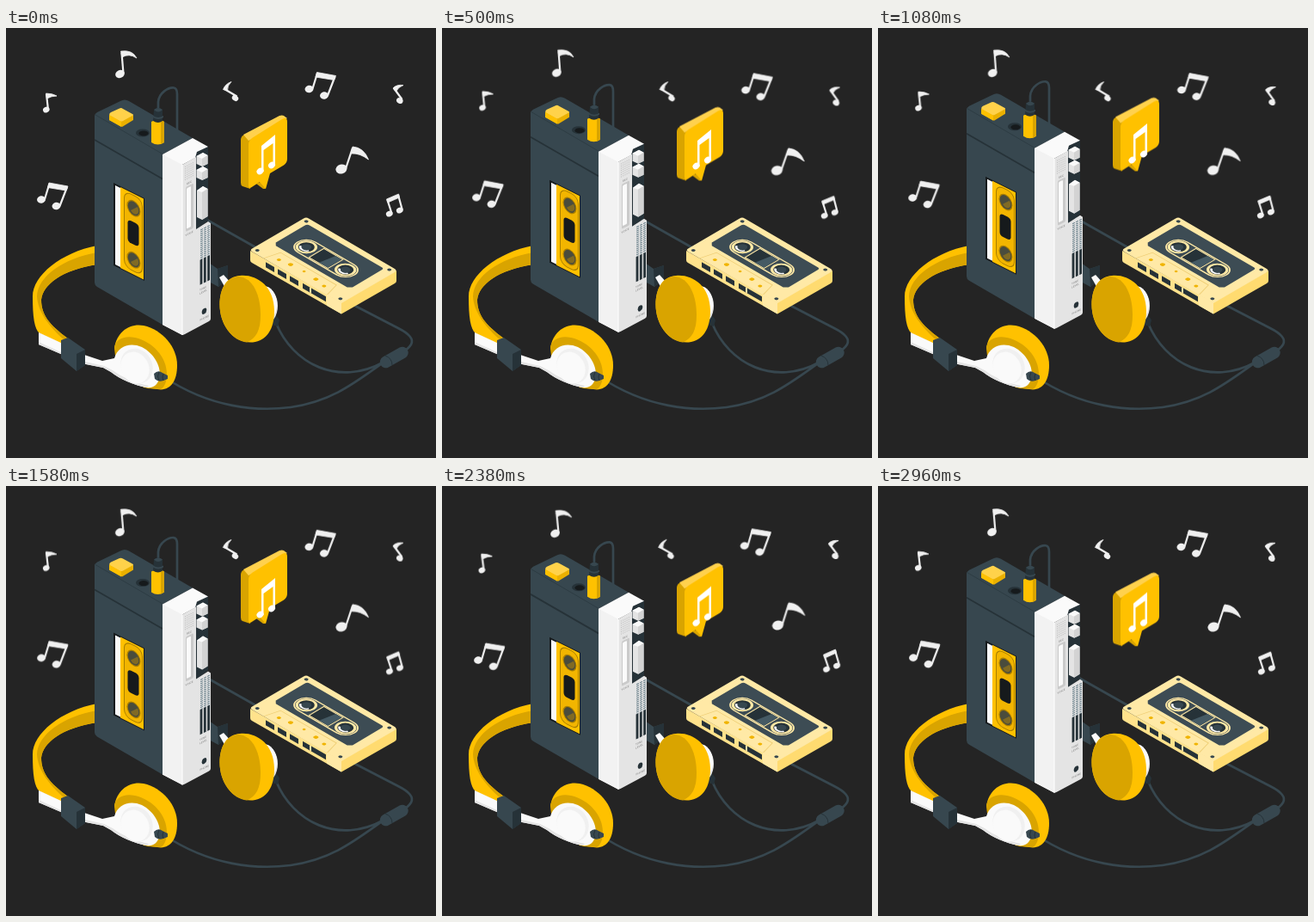
These frames come from a looping animation (500x500 px, 3000 ms). An HTML page:

```html
<!DOCTYPE html>
<html lang="en">
<head>
<meta charset="utf-8">
<title>Music player</title>
<style>
  html, body { margin: 0; height: 100%; overflow: hidden; background: #242424; }
  svg { display: block; width: 100vw; height: 100vh; }
  .float { animation: float 3s linear infinite; }
  .player { --rise: -10px; }
  .bubble { --rise: -28.5px; }
  .tune { --rise: -18px; }
  .notes { transform-origin: 249px 123px; animation: sway 3s linear infinite; }
  @keyframes float { 50% { transform: translateY(var(--rise)); } }
  @keyframes sway { 25% { transform: rotate(1deg); } 75% { transform: rotate(-1deg); } }
  .slate { fill: #37474f; }
  .label { fill: #3d4c54; }
  .deep { fill: #263238; }
  .black { fill: #161a1c; }
  .sun { fill: #ffc100; }
  .gold { fill: #d9a400; }
  .cream { fill: #ffe9a6; }
  .butter { fill: #ffe28c; }
  .white { fill: #fafafa; }
  .pale { fill: #e4e4e4; }
  .cable { fill: none; stroke: #37474f; stroke-width: 2.7; stroke-linecap: round; }
  .tiny { font: 3px Inter, sans-serif; fill: #777; }
  .notes { fill: #f0f0f0; stroke: #f0f0f0; }
  .notes path { fill: none; stroke-width: 2.2; stroke-linejoin: round; }
  .notes .solid { fill: #f0f0f0; stroke-width: .8; }
  .notes ellipse { stroke: none; }
</style>
</head>
<body>
<svg viewBox="0 0 500 500">
  <!-- cables -->
  <path class="cable" d="M230 221L292 256M400 320L456 349Q476 359 471 368Q468 373 461 377"/>
  <path class="cable" d="M314 343C333 390 386 418 440 388M184 406C238 442 292 446 331 441C379 434 405 413 440 388"/>
  <path d="M441.500 388.500L461 377.500" stroke="#37474f" stroke-width="13.500" stroke-linecap="round"/>
  <path d="M441 381Q449 384 449 392" fill="none" stroke="#263238"/>

  <!-- headband -->
  <path class="sun" d="M106 253C64 261 31 288 31 312C31 336 33 350 39 355L66 368L72 361C50 345 41 333 41 316C43 298 66 281 106 275Z"/>
  <path class="gold" d="M106 261C66 268 37 289 36 312C37 331 51 348 69 364L72 361C50 345 41 333 41 316C43 298 66 281 106 275Z"/>
  <path class="white" d="M38 354L66 367V380L38 368Z"/>
  <path class="pale" d="M38 365L66 378V380L38 368Z"/>

  <!-- far ear cup -->
  <path class="slate" d="M236 273L246 280L258 276V292L247 301L236 295Z"/>
  <path class="deep" d="M246 280L258 276V292L247 301Z"/>
  <path class="white" d="M248 290L253 287L262 297L256 304Z"/>
  <path class="deep" d="M307 335Q315 332 318 340L316 347L309 345Z"/>
  <ellipse class="pale" cx="302" cy="323" rx="14" ry="21"/>
  <ellipse class="white" cx="300" cy="321" rx="15" ry="21"/>
  <path class="sun" d="M272 288C290 286 312 299 312 329C312 350 303 364 287 365.500C263 367 248.500 344 248.500 322C248.500 302 257 289 272 288Z"/>
  <path class="gold" d="M270 289C288 290 296 312 296 334C296 351 291 361 280 365.500C263 364 248.500 344 248.500 322C248.500 303 256 290 270 289Z"/>

  <!-- cassette -->
  <path class="butter" d="M284 259L390 319V332.500L286 273Q284 272 284 270Z"/>
  <path d="M390 319L454 282V294Q454 296 452 297L390 332.500Z" fill="#ffdb70"/>
  <path class="cream" d="M287 256L346 221.500Q349 219.500 352 221.500L452 280Q455 282 452 284L390 320L286 260Q283 258 287 256Z"/>
  <g transform="matrix(1.05 .61 -1.016 .602 349 220)">
    <path class="label" d="M10 6H90Q92 6 92 9V42L89 45H10L7 42V9Q7 6 10 6Z"/>
    <rect class="cream" x="18" y="18.500" width="64" height="21" rx="10.500"/>
    <rect class="label" x="19.300" y="19.800" width="61.400" height="18.400" rx="9.200"/>
    <g id="reel">
      <circle class="cream" cx="28.400" cy="29" r="8.700"/>
      <circle class="deep" cx="28.400" cy="29" r="6.500"/>
      <path d="M24 31A5 5 0 0 0 33 31" fill="none" stroke="#fff" stroke-width="2"/>
      <circle class="slate" cx="28.400" cy="29" r="4"/>
    </g>
    <use href="#reel" x="43.200"/>
    <rect class="cream" x="39" y="20" width="22" height="18"/>
    <rect class="deep" x="40" y="21" width="20" height="16"/>
    <path d="M53 21H60V37H50Z" fill="#455a64"/>
    <path d="M15 64L19 49H81L85 64" fill="none" stroke="#efcf76" stroke-width=".8"/>
    <g fill="#37474f">
      <circle cx="4" cy="4" r="1.700"/><circle cx="96" cy="4" r="1.700"/>
      <circle cx="4" cy="60" r="1.700"/><circle cx="96" cy="60" r="1.700"/>
    </g>
    <g fill="#f0b400">
      <circle cx="25" cy="57" r="1.700"/><circle cx="36" cy="55" r="2"/><circle cx="64" cy="55" r="2"/>
      <circle cx="75" cy="57" r="1.700"/><circle cx="50" cy="54" r="1.300"/>
    </g>
  </g>
  <g transform="matrix(1 .57 0 1 284 259)">
    <path class="deep" d="M18 3H28V9H18ZM32 3H42V9H32ZM46 3H56V9H46ZM61 3H88V9H61Z"/>
    <path class="cream" d="M69 3H71V9H69ZM89 0H106V13H89Z"/>
  </g>

  <!-- player -->
  <g class="float player">
    <path class="cable" d="M177 97V86C178 75 189 69 195 69.500Q199 70 199 77V130"/>
    <path class="slate" d="M103 102Q103 100 106 98L133 85Q138 82 143 85L217 128L182 147V345L106 301Q103 299 103 296Z"/>
    <path d="M103 130L182 175.500" stroke="#263238" stroke-width="1.800"/>
    <path d="M104 101L182 146.500" stroke="#2d3c43" stroke-width="1"/>

    <path d="M120 101L134 108L148 101V107L135 115L120 107Z" fill="#eab000"/>
    <path d="M122 98L132 93.500Q134 92.500 136 94L147 100Q149 101 147 102L136 108Q134 109 132 108L121 102Q119 100 122 98Z" fill="#ffd24a"/>
    <path class="sun" d="M120 101L134 109V115L120 107Z"/>
    <ellipse class="deep" cx="159" cy="122" rx="8" ry="4.500"/>
    <ellipse class="black" cx="160" cy="122.500" rx="5.500" ry="3"/>
    <path class="sun" d="M169 109Q176.500 104 184 109V133Q176.500 138 169 133Z"/>
    <path class="gold" d="M180 107L184 109V133L180 135Z"/>
    <path class="deep" d="M172 95Q177 91 182 95V108Q177 112 171 108Z"/>
    <path class="slate" d="M172 95Q177 91 182 95Q177 100 172 95M171 102Q177 106 183 102V104Q177 108 171 104Z"/>

    <!-- cassette window -->
    <g transform="matrix(1 .5 0 1 125 180)">
      <path class="black" d="M0 0H36V96H0Z"/>
      <path class="white" d="M2 2H8V94H2Z"/>
      <path class="sun" d="M8 1H35V95H8Z"/>
      <rect x="12.500" y="3" width="21" height="88" rx="8" fill="#f2b500" stroke="#a97f00"/>
      <g id="spool">
        <ellipse cx="23.500" cy="18" rx="8" ry="9" fill="#a97f00"/>
        <ellipse cx="23.500" cy="18" rx="6.800" ry="7.800" fill="#4a4c3c"/>
        <path d="M20 22L28 14Q31 19 27 23Q23 26 20 22Z" fill="#806a24"/>
      </g>
      <use href="#spool" y="60"/>
      <rect class="black" x="16.500" y="34" width="13" height="26" rx="4"/>
    </g>

    <!-- white panel -->
    <path class="deep" d="M219 142L235 138V224L219 236Z"/>
    <path class="white" d="M182 147L217 128L235 138L222 144L220 151L205 159V357L182 345Z"/>
    <path d="M182 147L205 159V357L182 345Z" fill="#f2f2f2"/>
    <path class="pale" d="M205 159L221 150V234L235 225L238 227V338Q238 340 236 341L208 356Q206 357 205 357Z"/>
    <path d="M205 159V357" stroke="#fff"/>
    <g id="key">
      <path class="pale" d="M221.500 149L229 145L234.500 148V158L228 161L221.500 158Z"/>
      <path class="white" d="M221.500 149L229 145L234.500 148L228 152Z"/>
      <path d="M228 152L234.500 148V158L228 161Z" fill="#d3d3d3"/>
    </g>
    <use href="#key" y="16"/>
    <path class="pale" d="M222 189L229 184L234.500 187V219L228 223L222 220Z"/>
    <path class="white" d="M222 189L229 184L234.500 187L228 191Z"/>
    <path d="M228 191L234.500 187V219L228 223Z" fill="#d3d3d3"/>
    <g transform="matrix(1 -.5 0 1 205 159)">
      <path d="M3 4H14M3 6.500H14M3 9H14M3 11.500H14M3 14H14M3 16.500H14M3 19H14" stroke="#bbb" stroke-dasharray="1 1.200"/>
      <rect x="4" y="28" width="9" height="52" rx="1.500" fill="#cacaca"/>
      <rect class="white" x="5" y="30" width="5" height="47" rx="1"/>
      <text class="tiny" x="5" y="26">REC</text>
      <text class="tiny" x="3.500" y="85">VOICE</text>
      <path d="M22.500 86V121M26.500 86V121M30.500 86V121" stroke="#546e7a" stroke-width="2.800" stroke-dasharray="1 1.300"/>
      <path d="M22 121V150M26.300 121V150M30.600 121V150" stroke="#263238" stroke-width="2.800"/>
      <text class="tiny" x="20" y="157">TONE</text>
      <text class="tiny" x="20" y="161">LEVEL</text>
      <ellipse class="deep" cx="25.500" cy="183" rx="2.800" ry="3.300"/>
      <text class="tiny" x="20.500" y="192">PHONE</text>
    </g>
  </g>

  <!-- near ear cup -->
  <path class="sun" d="M126 372C129 353 144 343 160 346C182 351 199 371 199 392C199 410 192 420 180 420.500L160 418Z"/>
  <path class="gold" d="M126 373C126 362 138 357 150 360C172 365 187 384 187 402C187 412 184 418 180 420L164 419L128 389Z"/>
  <path class="white" d="M88 379L112 387L126 384C130 370 144 365 158 371C172 378 182 395 178 408C176 416 170 419 164 418C150 416 132 408 122 400L113 395L88 390Z"/>
  <path class="pale" d="M88 387L114 393L124 398C136 407 152 413 166 416L164 418C150 416 132 408 122 400L113 395L88 390Z"/>
  <ellipse cx="152" cy="393" rx="18" ry="21" transform="rotate(-28 152 393)" fill="#f0f0f0"/>
  <ellipse class="white" cx="150" cy="395" rx="16" ry="19" transform="rotate(-28 150 395)"/>
  <path class="slate" d="M172 402Q177 397 182 401L188 404V408L183 410Q177 412 173 408Z"/>
  <path d="M178 400Q175 405 178 410M183 402Q181 406 183 410" fill="none" stroke="#263238"/>
  <path class="slate" d="M64 363L72 360L92 374V392L82 399L64 384Z"/>
  <path class="deep" d="M82 379L92 374V392L82 399Z"/>

  <!-- speech bubble -->
  <g class="float bubble">
    <path class="gold" d="M273 130Q273 126 277 124L288 128L284 187L275 184Q273 183 273 180Z"/>
    <path d="M276 124L318 102Q321 101 323 102L327 105L288 128L282 131Z" fill="#ffd14d"/>
    <path class="gold" d="M291 181L298 178L302 187L299 187Z"/>
    <path class="sun" d="M282 136Q282 131 286 128L321 106Q327 103 327 109V152Q327 157 323 159.500L307 169L302 187L295 179L285 185.500Q282 187 282 183Z"/>
  </g>
  <g class="float tune" fill="#fff">
    <ellipse cx="295.500" cy="166.500" rx="4.300" ry="3.500" transform="rotate(-40 295.500 166.500)"/>
    <ellipse cx="309" cy="159.500" rx="4.300" ry="3.500" transform="rotate(-40 309 159.500)"/>
    <path d="M297 137L313 124V160H310.500V134L299.500 142V167H297Z"/>
  </g>

  <!-- notes -->
  <g class="notes">
    <ellipse cx="132.500" cy="53.500" rx="5.500" ry="4.500" transform="rotate(-25 132.500 53.500)"/>
    <path d="M136.500 53L134.500 29"/>
    <path class="solid" d="M133.500 27Q147 25 152 35Q143 29 135 34Z"/>

    <ellipse cx="46.800" cy="95" rx="3.900" ry="3.200" transform="rotate(-25 46.800 95)"/>
    <path d="M49 95L47 77" stroke-width="1.500"/>
    <path class="solid" d="M46.500 76Q54 76 59 79Q53 79 47.500 82Z"/>

    <g id="pair">
      <ellipse cx="41" cy="199.500" rx="5" ry="4.200" transform="rotate(-10 41 199.500)"/>
      <ellipse cx="58.500" cy="207" rx="5" ry="4.200" transform="rotate(-10 58.500 207)"/>
      <path d="M45 199L50.500 181M62.500 207L71 185"/>
      <path class="solid" d="M50 180L72 184L70 189L48.500 185.500Z"/>
    </g>
    <use href="#pair" x="311.500" y="-128.500"/>

    <ellipse cx="266.500" cy="81.500" rx="3.900" ry="3.200" transform="rotate(35 266.500 81.500)"/>
    <path d="M268.500 79.500L254 71" stroke-width="1.500"/>
    <path class="solid" d="M252.500 71.500Q255 65 262 62.500Q257 67 257.500 73Z"/>

    <ellipse cx="457.800" cy="84.500" rx="3.900" ry="3.200" transform="rotate(25 457.800 84.500)"/>
    <path d="M460.500 83L451 70" stroke-width="1.500"/>
    <path class="solid" d="M450 70Q454 65.500 462 66.500Q456 68.500 453.500 74Z"/>

    <ellipse cx="390" cy="164" rx="6.600" ry="5.400" transform="rotate(-15 390 164)"/>
    <path d="M395 163.500L403 139.500"/>
    <path class="solid" d="M403 138Q416 139 421.500 153Q411 145 401 146Z"/>

    <ellipse cx="445.800" cy="216" rx="4" ry="3.300" transform="rotate(-25 445.800 216)"/>
    <ellipse cx="457.800" cy="212" rx="4" ry="3.300" transform="rotate(-25 457.800 212)"/>
    <path d="M448.500 215.500L443.500 200M460.800 211.500L456 194" stroke-width="1.600"/>
    <path class="solid" d="M442.500 199L456.500 193L457.500 197L443.800 203Z"/>
  </g>
</svg>
</body>
</html>
```
